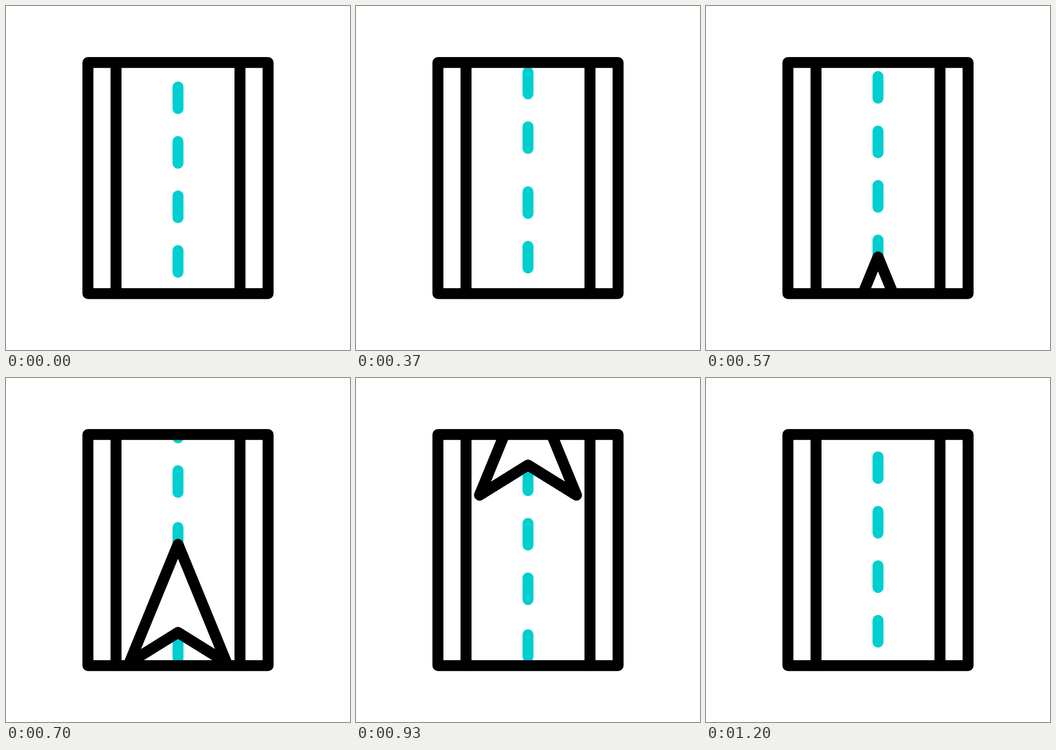
Write an HTML page that moves like this. It is 640 px wide and 640 px high and loops after 1.67 s.

```html
<!DOCTYPE html>
<html lang="en">
<head>
<meta charset="utf-8">
<title>Road navigation</title>
<style>
  html, body { margin: 0; width: 100%; height: 100%; overflow: hidden; background: #fff; }
  svg { display: block; width: 100vw; height: 100vh; }
</style>
</head>
<body>
<svg viewBox="0 0 640 640" fill="none" stroke="#000" stroke-width="20.4" stroke-linecap="round" stroke-linejoin="round">
  <clipPath id="road"><rect x="162" y="108" width="316" height="424"/></clipPath>
  <g clip-path="url(#road)">
    <path id="dashes" stroke="#00cfcf"/>
    <path id="arrow" d="M320 0L410.2 220L320 164L229.8 220Z" fill="#fff"/>
  </g>
  <path d="M204.7 105.2V535M435.3 105.2V535"/>
  <rect x="152.4" y="105.1" width="335.2" height="430"/>
</svg>
<script>
const LOOP = 1670, LAST = 36;
const dashes = document.getElementById('dashes');
const arrow = document.getElementById('arrow');

// Road position: [step, y of the middle dash group]
const road = [[0, -284.8], [11, -89.8], [17, 121], [21, 268], [25, 394.5], [28, 467.5], [36, 546.5]];

const slope = i => (road[i + 1][1] - road[i][1]) / (road[i + 1][0] - road[i][0]);

// Tangent at a key; the road is at rest at both ends
function speed(i) {
  if (i === 0 || i === road.length - 1) return 0;
  const before = road[i][0] - road[i - 1][0];
  const after = road[i + 1][0] - road[i][0];
  return (slope(i - 1) * after + slope(i) * before) / (before + after);
}

function roadY(k) {
  let i = 0;
  while (i < road.length - 2 && k >= road[i + 1][0]) i++;
  const [k0, y0] = road[i], [k1, y1] = road[i + 1];
  const w = k1 - k0, u = (k - k0) / w, v = 1 - u;
  return y0 * v * v * (1 + 2 * u) + y1 * u * u * (1 + 2 * v)
    + w * u * v * (speed(i) * v - speed(i + 1) * u);
}

function arrowY(k) {
  const u = Math.min(1, Math.max(0, (k - 12.1) / 22.3));
  return 552.5 - 693 * u * u * (3 - 2 * u);
}

function dashGroup(top) {
  let d = '';
  for (let i = 0; i < 4; i++) d += `M320 ${(top + 10.2 + i * 101.4).toFixed(2)}v40.4`;
  return d;
}

// 30 steps per second, each starting on a 10 ms tick
function draw(ms) {
  const tick = Math.floor((ms % LOOP) / 10);
  const k = Math.min(LAST, Math.floor((tick * 3 + 1) / 10));
  const y = roadY(k);
  dashes.setAttribute('d', [425.3, 0, -410].map(shift => dashGroup(y + shift)).join(''));
  arrow.setAttribute('transform', `translate(0 ${arrowY(k).toFixed(2)})`);
}

let start;
function loop(now) {
  start ??= now;
  draw(now - start);
  requestAnimationFrame(loop);
}
draw(0);
requestAnimationFrame(loop);
</script>
</body>
</html>
```
